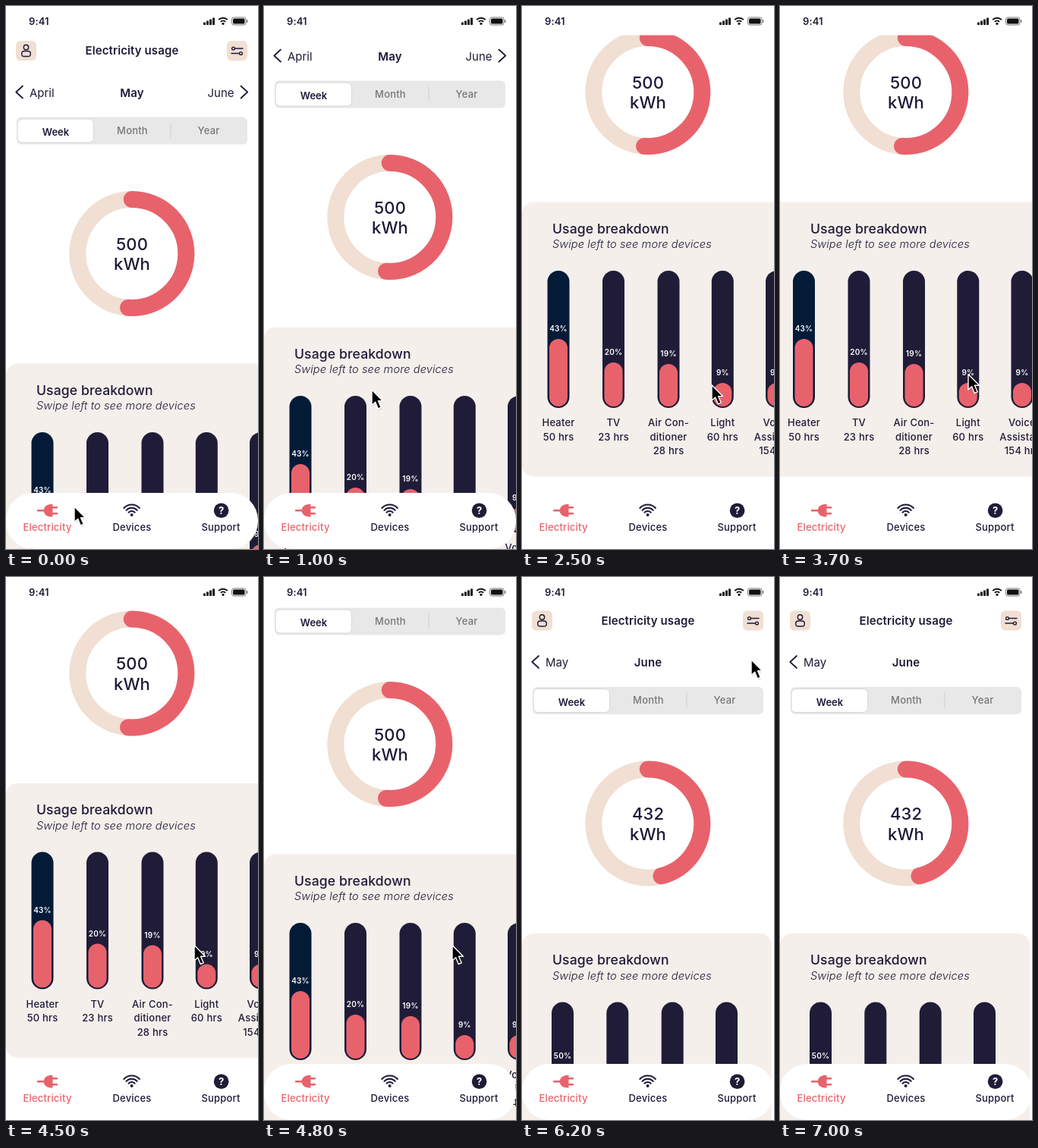
An HTML page for the animation above (7200 ms loop, 332 by 716 pixels).

```html
<!DOCTYPE html>
<html lang="en">
<head>
<meta charset="utf-8">
<title>Electricity usage</title>
<style>
html, body { margin: 0; width: 100%; height: 100%; overflow: hidden; background: #fff; }
svg { display: block; width: 332px; height: 716px; }
text { font-family: Inter, "Open Sans", sans-serif; fill: #1f1a38; }
.body { font-size: 15px; }
.title { font-size: 15px; font-weight: 600; letter-spacing: .1px; }
.tab { font-size: 13px; font-weight: 500; letter-spacing: .2px; fill: #77757a; }
.tab.on { font-weight: 600; letter-spacing: 0; fill: #1f1a38; }
.big { font-size: 22px; font-weight: 500; letter-spacing: .1px; }
.head { font-size: 17.6px; font-weight: 500; letter-spacing: .1px; }
.sub { font-size: 14.6px; font-style: italic; font-weight: 300; letter-spacing: .1px; }
.label { font-size: 13px; font-weight: 500; letter-spacing: .2px; }
.pct { font-size: 10px; font-weight: 600; letter-spacing: .2px; fill: #fff; }
.line { fill: none; stroke: #1f1a38; stroke-linecap: round; stroke-linejoin: round; }
</style>
</head>
<body>
<svg viewBox="0 0 332 716" id="stage"></svg>
<script>
const INK = '#201c38', CORAL = '#e8626c', SAND = '#f0dfd2', PANEL = '#f5efeb';
const LOOP = 7200, STEP = 100;

const text = (x, y, str, cls, anchor = 'middle', extra = '') =>
  `<text x="${x}" y="${y}" class="${cls}" text-anchor="${anchor}" ${extra}>${str}</text>`;
const box = (x, y, w, h, r, fill, extra = '') =>
  `<rect x="${x}" y="${y}" width="${w}" height="${h}" rx="${r}" fill="${fill}" ${extra}/>`;
const line = (d, width, extra = '') =>
  `<path d="${d}" class="line" stroke-width="${width}" ${extra}/>`;

// Arc around (cx, cy); angles in degrees clockwise from the top
function arc(cx, cy, r, from, to) {
  const point = a => {
    const k = a * Math.PI / 180;
    return `${(cx + r * Math.sin(k)).toFixed(2)} ${(cy - r * Math.cos(k)).toFixed(2)}`;
  };
  return `M${point(from)}A${r} ${r} 0 ${to - from > 180 ? 1 : 0} 1 ${point(to)}`;
}

function bar(x, pct, fillTop, labels, color = INK) {
  const cx = x + 14.5;
  return box(x, 562, 29, 181, 14.5, color)
    + box(x + 2.5, fillTop, 24, 741 - fillTop, 12, CORAL)
    + text(cx, fillTop - 10, pct + '%', 'pct')
    + labels.map((s, i) => text(cx, 767 + i * 18.7, s, 'label')).join('');
}

const header = box(13, 46, 27, 26, 6, SAND) + box(291, 46, 27, 26, 6, SAND)
  + '<circle cx="26.5" cy="54.5" r="3.2" class="line" stroke-width="1.4"/>'
  + '<rect x="20.7" y="59.5" width="11.6" height="7" rx="3.3" class="line" stroke-width="1.4"/>'
  + line('M302 56H312M297 62.5H307', 1.4)
  + '<circle cx="299.5" cy="56" r="1.9" class="line" stroke-width="1.4"/>'
  + '<circle cx="309.5" cy="62.5" r="1.9" class="line" stroke-width="1.4"/>'
  + text(166, 64, 'Electricity usage', 'title');

const tabs = box(14, 146.5, 304, 36, 6, '#e9e8e8')
  + box(15, 149, 100.5, 31, 6, '#fff', 'stroke="#d8d6d6"')
  + '<path d="M217 154V174" stroke="#cfcdcd"/>'
  + text(65.5, 171, 'Week', 'tab on') + text(166.5, 168.7, 'Month', 'tab')
  + text(267, 168.7, 'Year', 'tab');

function screen(id, prev, month, next, usage, angle, panelWidth, bars) {
  return `<g id="${id}"><rect width="332" height="716" fill="#fff"/><g id="${id}Page">`
    + header
    + line('M22 105.5L13.3 113.5 22 121.5', 1.8) + text(31, 119.5, prev, 'body', 'start')
    + text(166, 119.5, month, 'title')
    + (next ? text(300.5, 119.5, next, 'body', 'end') + line('M309.5 105.5L318.2 113.5 309.5 121.5', 1.8) : '')
    + tabs
    + `<circle cx="165.8" cy="326.5" r="71.5" fill="none" stroke="${SAND}" stroke-width="22"/>`
    + `<path d="${arc(165.8, 326.5, 71.5, 0, angle)}" fill="none" stroke="${CORAL}" stroke-width="22" stroke-linecap="round"/>`
    + text(166, 321.5, usage, 'big') + text(166, 348, 'kWh', 'big')
    + `<g id="${id}Row">` + box(0, 471.5, panelWidth, 362, 15, PANEL) + bars + '</g>'
    + text(40, 512.8, 'Usage breakdown', 'head', 'start')
    + text(40, 532, 'Swipe left to see more devices', 'sub', 'start')
    + '</g></g>';
}

const mayBars = bar(33.5, 43, 652, ['Heater', '50 hrs'], '#041b38')
  + bar(106, 20, 683, ['TV', '23 hrs'])
  + bar(178.5, 19, 685, ['Air Con-', 'ditioner', '28 hrs'])
  + bar(249.8, 9, 710, ['Light', '60 hrs'])
  + bar(321, 9, 710, ['Voice', 'Assistant', '154 hrs']);
const juneBars = bar(39, 50, 646.5, ['Heater', '50 hrs'])
  + bar(111.3, 20, 700, ['TV', '23 hrs'])
  + bar(183.7, 19, 702, ['Air Con-', 'ditioner', '28 hrs'])
  + bar(255, 11, 708, ['Light', '60 hrs']);

const status = '<rect width="332" height="38.5" fill="#fff"/>'
  + text(30, 25, '9:41', 'title', 'start', 'style="font-size:13px"')
  + [0, 1, 2, 3].map(i => box(260 + i * 4, 21.5 - i * 2, 3, 3.5 + i * 2, .7, '#111')).join('')
  + '<g fill="none" stroke="#111" stroke-width="2">'
  + [4.5, 8.3].map(r => `<path d="${arc(286, 24, r, -45, 45)}"/>`).join('')
  + '</g><circle cx="286" cy="23.3" r="1.6" fill="#111"/>'
  + box(297.5, 15, 18.5, 10, 2.8, 'none', 'stroke="#777"') + box(299, 16.5, 15.5, 7, 1.6, '#111')
  + box(317, 18, 1.4, 4, .7, '#777');

const nav = box(0, 642, 332, 74, 36, '#fff')
  + `<path d="M42 665.3H51M60 661.3H67M60 669.3H67" stroke="${CORAL}" stroke-width="2.4" stroke-linecap="round"/>`
  + `<path d="M61.5 657V673.5H58Q50 672 49.5 665.3 50 658.500 58 657Z" fill="${CORAL}"/>`
  + [5.5, 9.7, 14].map(r => line(arc(165.6, 671.5, r, -47, 47), 2.1)).join('')
  + `<circle cx="165.6" cy="671" r="2" fill="${INK}"/>`
  + `<circle cx="283.6" cy="665.3" r="9.8" fill="${INK}"/>`
  + text(283.6, 670, '?', 'title', 'middle', 'style="fill:#fff;font-size:13px;font-weight:700"')
  + text(54.500, 692, 'Electricity', 'label', 'middle', `style="fill:${CORAL}"`)
  + text(166, 692, 'Devices', 'label') + text(283, 692, 'Support', 'label');

const cursor = '<g id="cursor"><path d="M1 2V22L5.500 18 9 27 13 25.300 9.200 16.500H15Z" fill="#0002"/>'
  + '<path d="M0 0V20.500L4.700 16.300 8.300 25 12.200 23.300 8.500 14.800H14.500Z" fill="#000" stroke="#fff" stroke-width="1.4" stroke-linejoin="round"/></g>';

document.getElementById('stage').innerHTML =
  screen('may', 'April', 'May', 'June', '500', 183.8, 398, mayBars)
  + screen('june', 'May', 'June', '', '432', 165.7, 329, juneBars)
  + status + nav + cursor;

const $ = id => document.getElementById(id);
const smooth = u => u * u * (3 - 2 * u);
const linear = u => u;

// Value at time t along [time, value] keys
function track(t, keys, ease) {
  if (t <= keys[0][0]) return keys[0][1];
  for (let i = 1; i < keys.length; i++) {
    const [t0, a] = keys[i - 1], [t1, b] = keys[i];
    if (t <= t1) return a + (b - a) * ease((t - t0) / (t1 - t0));
  }
  return keys[keys.length - 1][1];
}

const scrollKeys = [[100, 0], [300, 1.5], [800, 1.5], [900, 10], [1000, 48], [1100, 112],
  [1200, 170], [1300, 203], [1400, 213], [4400, 213], [4600, 186], [4800, 106],
  [5000, 24], [5100, 6], [5200, 1.5]];
const swipeKeys = [[2500, 0], [3100, 66], [3500, 66], [3600, 44], [3700, 16.5], [3800, 5], [3900, 0]];
const cursorX = [[0, 90], [700, 142], [1700, 142], [2400, 250], [2500, 250], [3100, 160],
  [3200, 160], [3400, 168], [3500, 168], [3700, 248], [5200, 248], [5800, 302]];
const cursorY = [[0, 660], [700, 506], [1700, 506], [2400, 500], [3100, 496], [3500, 492],
  [3700, 485.5], [5200, 485.5], [5800, 109]];

function frame() {
  const t = Math.floor(performance.now() % LOOP / STEP) * STEP;
  const move = (id, x, y) => $(id).setAttribute('transform', `translate(${x} ${y})`);
  move('mayPage', 0, -track(t, scrollKeys, linear));
  move('junePage', 0, -1.5);
  move('mayRow', -track(t, swipeKeys, linear), 0);
  $('june').setAttribute('opacity', track(t, [[5900, 0], [6200, 1]], linear));
  move('cursor', track(t, cursorX, smooth), track(t, cursorY, smooth));
  $('cursor').setAttribute('visibility', t < 6900 ? 'visible' : 'hidden');
  requestAnimationFrame(frame);
}
frame();
</script>
</body>
</html>
```
